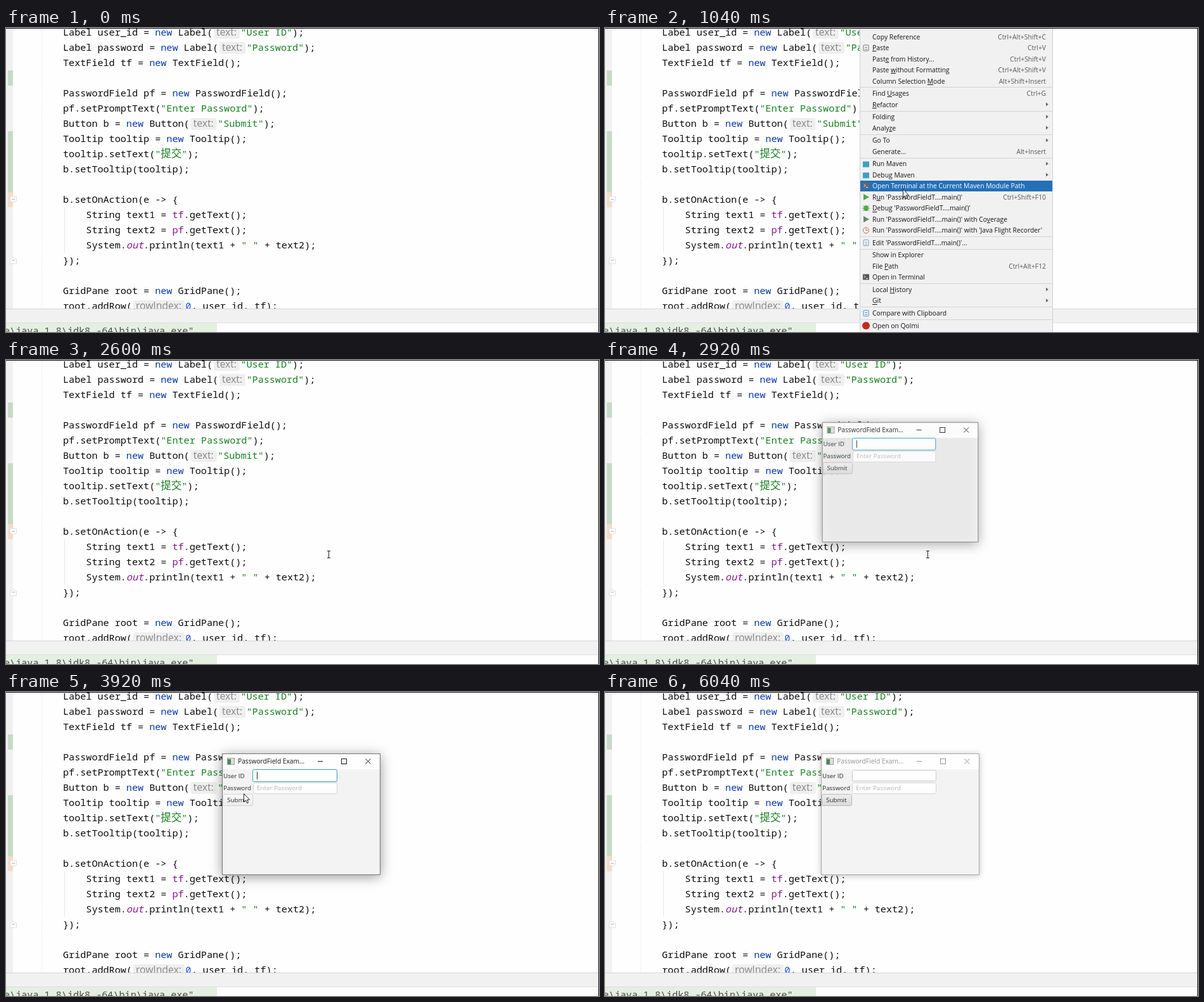
These frames come from a looping animation (936x480 px, 6.48 s). An HTML page with a canvas:

```html
<!DOCTYPE html>
<html lang="en">
<head>
<meta charset="utf-8">
<title>Tooltip demo</title>
<style>
html, body { margin: 0; width: 100%; height: 100%; overflow: hidden; background: #fefefe; }
canvas { display: block; }
</style>
</head>
<body>
<canvas id="stage" width="936" height="480"></canvas>
<script>
const ctx = document.getElementById('stage').getContext('2d');
const LOOP = 6480, STEP = 40;
const MENU_OPEN = 680, MENU_CLOSE = 1800;
const WIN_OPEN = 2840, WIN_BLUR = 6000;
const TIP_SHOW = 4720, TIP_HIDE = 5240;
const PAGE = '#fefefe', PANEL = '#f1f1f1';
const MONO = '"Noto Sans Mono", "DejaVu Sans Mono", monospace';
const SANS = '"Open Sans", "Noto Sans", sans-serif';
const CJK = '"Noto Sans CJK SC", "Noto Sans CJK", sans-serif';

// Hints stand between « and ».
const code = [
  'Label user_id = new Label(«text:»"User ID");',
  'Label password = new Label(«text:»"Password");',
  'TextField tf = new TextField();',
  '',
  'PasswordField pf = new PasswordField();',
  'pf.setPromptText("Enter Password");',
  'Button b = new Button(«text:»"Submit");',
  'Tooltip tooltip = new Tooltip();',
  'tooltip.setText("提交");',
  'b.setTooltip(tooltip);',
  '',
  'b.setOnAction(e -> {',
  '    String text1 = tf.getText();',
  '    String text2 = pf.getText();',
  '    System.out.println(text1 + " " + text2);',
  '});',
  '',
  'GridPane root = new GridPane();',
  'root.addRow(«rowIndex:»0, user_id, tf);'
];

// "-" starts a group, "&" marks the underlined letter, ">" opens a submenu.
const main = "'PasswordFieldT....main()'";
const menu = [
  ['Copy Reference', 'Ctrl+Alt+Shift+C'],
  ['&Paste', 'Ctrl+V', 'page', '#6e6e6e'],
  ['Past&e from History...', 'Ctrl+Shift+V'],
  ['Paste &without Formatting', 'Ctrl+Alt+Shift+V'],
  ['Column Selection &Mode', 'Alt+Shift+Insert'],
  ['-Find &Usages', 'Ctrl+G'],
  ['&Refactor', '>'],
  ['-Folding', '>'],
  ['Analy&ze', '>'],
  ['-Go To', '>'],
  ['Generate...', 'Alt+Insert'],
  ['-Run Maven', '>', 'square', '#3f9fc4'],
  ['Debug Maven', '>', 'square', '#3f9fc4'],
  ['Open Terminal at the Current Maven Module Path', '', 'terminal', '#666666'],
  ['R&un ' + main, 'Ctrl+Shift+F10', 'play', '#55a648'],
  ['&Debug ' + main, '', 'bug', '#55a648'],
  ['Run ' + main + ' with Co&verage', '', 'play', '#64866a'],
  ['Run ' + main + " with 'Java Flight Recorder'", '', 'clock', '#b0645c'],
  ['-Edit ' + main + '...', '', 'page', '#7d93a0'],
  ['-Show in Explorer', ''],
  ['File &Path', 'Ctrl+Alt+F12'],
  ['Open in Terminal', '', 'terminal', '#555555'],
  ['-Local &History', '>'],
  ['&Git', '>'],
  ['-Compare with Clipboard', '', 'page', '#3f8fc0'],
  ['-Open on Qolmi', '', 'disc', '#c32a20']
];
let rowY = 14 - 17.45;
const rows = menu.map(([label, keys, icon, color]) => {
  const group = label[0] === '-';
  rowY += group ? 19.65 : 17.45;
  const at = label.indexOf('&');
  return { text: label.replace(/^-|&/g, ''), mark: at < 0 ? -1 : at - group, keys, icon, color, group, y: rowY };
});

const path = [
  [680, 432, -20], [1040, 470, 254], [1200, 460, 296], [1320, 452, 317], [1600, 445, 270],
  [1760, 445, 270], [2240, 509, 307], [2840, 509, 307], [3200, 508, 305], [3480, 476, 252],
  [3920, 375, 160], [5200, 375, 160], [5440, 515, 250], [5640, 515, 250], [5960, 812, 484]
];

function rect(x, y, w, h, color) {
  ctx.fillStyle = color;
  ctx.fillRect(x, y, w, h);
}
function frame(x, y, w, h, color) {
  ctx.strokeStyle = color;
  ctx.strokeRect(x + .5, y + .5, w - 1, h - 1);
}
function box(x, y, w, h, r, fill, stroke) {
  ctx.beginPath();
  ctx.roundRect(x, y, w, h, r);
  ctx.fillStyle = fill;
  ctx.fill();
  if (stroke) { ctx.strokeStyle = stroke; ctx.stroke(); }
}
function poly(points, fill, stroke) {
  ctx.beginPath();
  points.forEach(([x, y]) => ctx.lineTo(x, y));
  ctx.closePath();
  ctx.fillStyle = fill;
  ctx.fill();
  if (stroke) { ctx.strokeStyle = stroke; ctx.stroke(); }
}
function lines(color, ...segments) {
  ctx.strokeStyle = color;
  ctx.beginPath();
  for (const [x1, y1, x2, y2] of segments) { ctx.moveTo(x1, y1); ctx.lineTo(x2, y2); }
  ctx.stroke();
}
function text(s, x, y, font, color, align = 'left') {
  ctx.font = font;
  ctx.fillStyle = color;
  ctx.textAlign = align;
  ctx.fillText(s, x, y);
  return ctx.measureText(s).width;
}

const tokens = /(«.+?»|"[^"]*"|\bnew\b|\b[tp]f(?=\.get)|\bout\b|\b\d(?=,))/;
function codeLine(line, y) {
  let x = 90;
  for (const part of line.split(tokens)) {
    if (part[0] === '«') {
      const hint = part.slice(1, -1), font = '15.7px ' + SANS;
      ctx.font = font;
      const w = ctx.measureText(hint).width;
      box(x + 2, y - 14, w + 9, 19, 3, '#efefef');
      text(hint, x + 6, y, font, '#858585');
      x += w + 12.5;
      continue;
    }
    const color = part[0] === '"' ? '#178020' : part === 'new' ? '#0b3aa6'
      : /^([tp]f|out)$/.test(part) ? '#82188c' : /^\d$/.test(part) ? '#1a50e0' : '#0c0c0c';
    const style = part === 'out' ? 'italic ' : '';
    for (const run of part.split(/([\u4e00-\u9fff]+)/)) {
      const font = /[\u4e00-\u9fff]/.test(run) ? '300 16.5px ' + CJK : style + '15.13px ' + MONO;
      x += text(run, x, y, font, color);
    }
  }
}

function drawEditor() {
  rect(0, 0, 936, 480, PAGE);
  rect(0, 0, 11, 443, '#f1f1f1');
  rect(3, 67, 8, 24, '#c6dbc6');
  rect(3, 163, 8, 96, '#c6dbc6');
  rect(3, 259, 8, 24, '#f3dcc8');
  ctx.setLineDash([2, 2]);
  lines('#ececec', [56.5, 0, 56.5, 443]);
  ctx.setLineDash([]);
  lines('#e6e6e6', [92.5, 283, 92.5, 355]);
  for (const y of [271, 367]) {
    const tip = y === 271 ? 5 : -5;
    poly([[6.5, y - tip], [16.5, y - tip], [16.5, y + tip * .4], [11.5, y + tip], [6.5, y + tip * .4]], PAGE, '#dcdcdc');
    lines('#b4b4b4', [9, y - .5, 14, y - .5]);
  }
  code.forEach((line, i) => codeLine(line, 12 + 24 * i));
  rect(0, 443, 936, 23, PANEL);
  rect(0, 443, 936, 1, '#d4d4d4');
  rect(0, 465, 936, 1, '#dedede');
  rect(0, 466, 936, 14, PAGE);
  rect(0, 466, 333, 14, '#e3f0e0');
  text('e\\java_1.8\\jdk8_-64\\bin\\java.exe"', -3, 483, '15.13px ' + MONO, '#484c48');
}

function drawIcon({ icon, color, y }) {
  const x = 412;
  if (icon === 'square') rect(x - 5, y - 4, 10, 9, color);
  if (icon === 'disc') box(x - 6, y - 6, 12, 12, 6, color);
  if (icon === 'play') poly([[x - 4, y - 5], [x + 5, y], [x - 4, y + 5]], color);
  if (icon === 'page') {
    box(x - 4, y - 4.5, 8, 9, 1, '#fafafa', color);
    lines(color, [x - 2, y - 1, x + 2, y - 1], [x - 2, y + 2, x + 2, y + 2]);
  }
  if (icon === 'terminal') {
    rect(x - 5, y - 5, 10, 9, color);
    lines('#fff', [x - 3, y - 3, x - 1, y - 1], [x - 1, y - 1, x - 3, y + 1], [x, y + 2, x + 3, y + 2]);
  }
  if (icon === 'bug') {
    lines(color, [x - 5, y - 4, x + 5, y + 4], [x - 5, y + 4, x + 5, y - 4], [x - 6, y, x + 6, y]);
    box(x - 3.5, y - 4.5, 7, 9, 3.5, color);
  }
  if (icon === 'clock') {
    box(x - 4.5, y - 4.5, 9, 9, 4.5, '#fafafa', color);
    lines(color, [x, y - 3, x, y], [x, y, x + 3, y]);
  }
}

function drawMenu(pointerY) {
  rect(402, 0, 305, 480, PANEL);
  for (const row of rows) {
    const active = Math.abs(pointerY - row.y) < 8.72;
    if (row.group) rect(403, Math.round(row.y - 10), 303, 1, '#d4d4d4');
    if (active) rect(402, Math.round(row.y - 8.7), 304, 17, '#2470b8');
    const ink = active ? '#fff' : '#161616', font = '10.35px ' + SANS;
    drawIcon(row);
    text(row.text, 422, row.y + 3.7, font, ink);
    if (row.mark >= 0) {
      const start = ctx.measureText(row.text.slice(0, row.mark)).width;
      rect(422 + start, Math.round(row.y + 5), ctx.measureText(row.text[row.mark]).width, 1, ink);
    }
    if (row.keys === '>') poly([[696, row.y - 3.5], [700, row.y - .5], [696, row.y + 2.5]], '#6c6c6c');
    else text(row.keys, 696, row.y + 3.7, font, active ? '#fff' : '#585858', 'right');
  }
  frame(402, -1, 305, 482, '#cfcfcf');
}

function drawWindow(t) {
  const active = t < WIN_BLUR, hover = t >= 3880 && t < TIP_HIDE;
  const grow = Math.min(1, (t - WIN_OPEN + STEP) / 240), ease = 1 - (1 - grow) ** 3;
  const ink = active ? '#141414' : '#949494', small = '9.8px ' + SANS;
  ctx.save();
  ctx.globalAlpha = ease;
  ctx.translate(466, 193);
  ctx.scale(.9 + .1 * ease, .9 + .1 * ease);
  ctx.translate(-466, -193);

  ctx.save();
  ctx.shadowColor = active ? 'rgba(0,0,0,.4)' : 'rgba(0,0,0,.25)';
  ctx.shadowBlur = active ? 18 : 9;
  ctx.shadowOffsetY = active ? 3 : 1;
  rect(341, 97, 250, 192, '#f3f3f3');
  ctx.restore();
  rect(342, 98, 248, 24, '#fefefe');
  frame(341, 97, 250, 192, active ? '#747474' : '#a8a8a8');

  rect(349, 104, 12, 11, '#dcdedc');
  rect(350, 106, 5, 8, '#4b8a58');
  frame(349, 104, 12, 11, '#9a9c9a');
  text('PasswordField Exam...', 366, 113, '10.2px ' + SANS, ink);
  lines(ink, [492, 109.5, 500, 109.5], [567.5, 105.5, 575.5, 113.5], [575.5, 105.5, 567.5, 113.5]);
  frame(529, 105, 9, 9, ink);

  text('User ID', 343, 135.7, small, '#282828');
  text('Password', 343, 154.7, small, '#282828');
  box(390.5, 123.5, 132, 17, 2, '#fefefe', '#cacaca');
  if (active) {
    box(389.5, 122.5, 133, 19, 2, '#fefefe', '#2aa0c4');
    if (Math.floor((t - 2860) / 500) % 2 === 0) rect(396, 126, 1, 12, '#222');
  }
  box(390.5, 143.5, 132, 17, 2, '#fefefe', '#d4d4d4');
  text('Enter Password', 396, 154.7, small, '#b4b4b4');

  const face = ctx.createLinearGradient(0, 161, 0, 180);
  face.addColorStop(0, hover ? '#f9f9f9' : '#efefef');
  face.addColorStop(1, hover ? '#ececec' : '#d9d9d9');
  box(342.5, 161.5, 47, 18, 2, face, hover ? '#d4d4d4' : '#bababa');
  text('Submit', 349, 173.7, small, '#282828');
  ctx.restore();
}

function drawTooltip() {
  ctx.save();
  ctx.shadowColor = 'rgba(0,0,0,.5)';
  ctx.shadowBlur = 6;
  ctx.shadowOffsetY = 2;
  box(383, 166, 30, 24, 4, '#383838');
  ctx.restore();
  text('提交', 389, 181.5, '9px ' + CJK, '#fff');
}

function pointerAt(t) {
  const i = path.findIndex(p => p[0] > t);
  if (i < 1) return null;
  const [t0, x0, y0] = path[i - 1], [t1, x1, y1] = path[i];
  const k = (t - t0) / (t1 - t0), e = k * k * (3 - 2 * k);
  return { x: x0 + (x1 - x0) * e, y: y0 + (y1 - y0) * e };
}

function drawPointer({ x, y }, arrow) {
  x = Math.round(x);
  y = Math.round(y);
  if (arrow) {
    const shape = [[0, 0], [0, 13], [3, 10.3], [5, 15], [7, 14], [5, 9.6], [9, 9.6]];
    poly(shape.map(([dx, dy]) => [x + .5 + dx, y + .5 + dy]), '#fff', '#222');
  } else {
    lines('#222', [x + .5, y - 6, x + .5, y + 6], [x - 2, y - 5.5, x + 3, y - 5.5], [x - 2, y + 5.5, x + 3, y + 5.5]);
  }
}

function draw(t) {
  const pointer = pointerAt(t);
  const menuOpen = t >= MENU_OPEN && t < MENU_CLOSE, winOpen = t >= WIN_OPEN;
  drawEditor();
  if (menuOpen) drawMenu(pointer.y);
  if (winOpen) drawWindow(t);
  if (t >= TIP_SHOW && t < TIP_HIDE) drawTooltip();
  if (pointer) {
    const { x, y } = pointer;
    const overWindow = winOpen && x > 341 && x < 591 && y > 97 && y < 289;
    drawPointer(pointer, menuOpen || overWindow || y > 443);
  }
  rect(0, 0, 936, 1, '#111');
  rect(935, 0, 1, 480, '#111');
}

const start = performance.now();
function tick() {
  const t = (performance.now() - start) % LOOP;
  draw(Math.floor(t / STEP) * STEP);
  requestAnimationFrame(tick);
}
tick();
</script>
</body>
</html>
```
